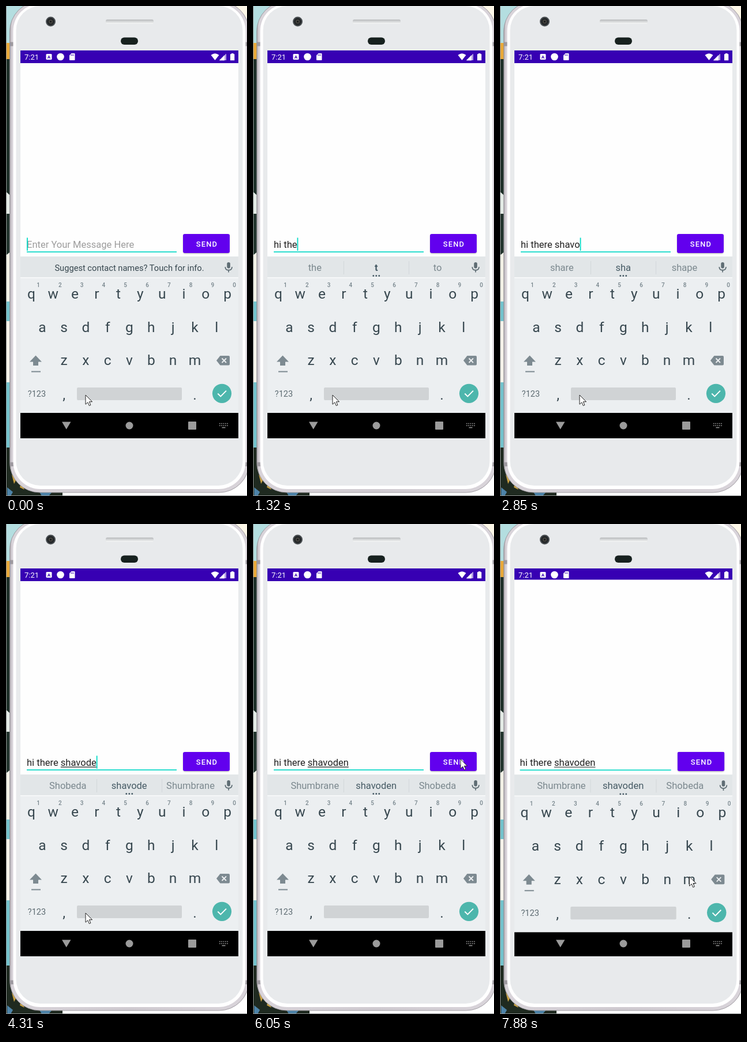
An HTML page for the animation above (8000 ms loop, 418x849 px).

```html
<!DOCTYPE html>
<html lang="en">
<head>
<meta charset="utf-8">
<title>Phone chat</title>
<style>
html, body { margin: 0; width: 100%; height: 100%; overflow: hidden; background: #fff; }
svg { display: block; width: 418px; height: 849px; font-family: Roboto, sans-serif; }
text { white-space: pre; }
.mid { text-anchor: middle; }
.key { font-size: 24.5px; fill: #37474f; }
.num { font-size: 10px; font-weight: 500; fill: #77858c; }
.sug { font-size: 16.5px; fill: #7b888e; }
.field { font-size: 16.55px; }
</style>
</head>
<body>
<svg viewBox="0 0 418 849">
  <defs>
    <linearGradient id="rim" x1="0" x2="1" y1="0" y2="0">
      <stop offset="0" stop-color="#a9a4aa"/>
      <stop offset=".009" stop-color="#d9d4da"/>
      <stop offset=".5" stop-color="#cfcad0"/>
      <stop offset=".991" stop-color="#d9d4da"/>
      <stop offset="1" stop-color="#a9a4aa"/>
    </linearGradient>
    <linearGradient id="slot" x1="0" x2="0" y1="0" y2="1">
      <stop offset="0" stop-color="#b4b6b8"/>
      <stop offset=".45" stop-color="#d6d8d9"/>
      <stop offset="1" stop-color="#f6f7f7"/>
    </linearGradient>
    <filter id="blur" x="-20%" y="-40%" width="140%" height="200%"><feGaussianBlur stdDeviation="1.3"/></filter>
    <clipPath id="screen"><rect x="25" y="77" width="378" height="672"/></clipPath>
    <clipPath id="btn"><rect x="307" y="395" width="81" height="33" rx="3"/></clipPath>
  </defs>

  <g id="wall">
    <rect width="418" height="849" fill="#fff"/>
    <path d="M300 0H418V600H300z" fill="#fdf7e8"/>
    <path d="M0 0H60V66H0z" fill="#b4dee0"/>
    <path d="M0 64H9V98H0z" fill="#e9a93a"/>
    <path d="M0 92H9V330L0 322z" fill="#1d2f28"/>
    <path d="M0 322L9 330V362H0z" fill="#e4ebe6"/>
    <path d="M0 360H9V425L0 432z" fill="#22342d"/>
    <path d="M0 432L9 425V515H0z" fill="#f3f1e6"/>
    <path d="M0 512H9V546H0z" fill="#74c3cd"/>
    <path d="M0 546H9V655H0z" fill="#f6f3ea"/>
    <path d="M0 652H9V770H0z" fill="#74c3cd"/>
    <path d="M0 765H98V849H0z" fill="#1f2a20"/>
    <path d="M10 812L18 820 14 828zM26 826L32 838 24 834z" fill="#c9a142"/>
    <path d="M2 834L12 842 8 849H2zM58 842H80L74 849H62z" fill="#4d83a8"/>
  </g>

  <g id="phone">
    <rect x="6.500" y="-8" width="415" height="851" rx="52" fill="url(#rim)" stroke="#8f8b91" stroke-width=".8"/>
    <path d="M7 66H14M414 66H418M7 794H14M414 794H418" stroke="#9d999f" stroke-width="7"/>
    <rect x="12.500" y="-4" width="403" height="841" rx="47" fill="#fff"/>
    <rect x="17.500" y="0" width="393" height="831" rx="42" fill="#e8eaec"/>
    <circle cx="77.500" cy="27" r="8.500" fill="#4a4f52"/>
    <circle cx="77.500" cy="27" r="6.500" fill="#232628"/>
    <circle cx="77.500" cy="27" r="3.500" fill="#45443f"/>
    <circle cx="77.500" cy="27" r="1.600" fill="#15181b"/>
    <rect x="173" y="23.500" width="83" height="7.500" rx="2.500" fill="url(#slot)"/>
    <rect x="199" y="54.500" width="30" height="12.500" rx="6.200" fill="#17211f"/>
    <path d="M0 0V849M0 849H418" stroke="#8d9090" stroke-width="2"/>
  </g>

  <g id="bars">
    <rect x="25" y="77" width="378" height="23" fill="#3700b3"/>
    <text x="32" y="93" font-size="13" fill="#fff">7:21</text>
    <g fill="#fff">
      <rect x="69.500" y="83" width="10" height="10" rx="1.500"/>
      <circle cx="94.500" cy="88" r="6.300"/>
      <path d="M113.500 82H118.500Q119.500 82 119.500 83V93Q119.500 94 118.500 94H111Q110 94 110 93V85.500z"/>
      <path d="M355.500 85Q362.500 79.500 369.500 85L362.500 94z"/>
      <path d="M389 83.300H391V82H394.500V83.300H396.300V94.300H389z"/>
      <path d="M370.500 94L382 82.500V94z" fill-opacity=".4"/>
      <path d="M370.500 94L379 85.500V94zM381.200 83.400V94" stroke="#fff" stroke-width=".8"/>
    </g>
    <text class="mid" x="74.500" y="91" font-size="8" font-weight="700" fill="#3700b3">A</text>
    <path d="M113 84V86M115 84V86M117 84V86" stroke="#3700b3"/>
    <rect x="25" y="705" width="378" height="44" fill="#000"/>
    <g fill="#9b9b9b">
      <path d="M97 720.500H112.500L104.700 733.500z"/>
      <circle cx="214" cy="727" r="6.500"/>
      <rect x="316" y="720" width="14" height="14" rx="1"/>
      <path d="M374.500 730.500H380.500" stroke="#9b9b9b" stroke-width="1.500"/>
      <path d="M370 723.500H385M370 727H385" stroke="#9b9b9b" stroke-width="1.600" stroke-dasharray="1.700 1.620"/>
    </g>
  </g>

  <g clip-path="url(#screen)">
    <g id="app">
      <rect x="20" y="99" width="388" height="336" fill="#fefefe"/>
      <text class="field" id="hint" x="36" y="419" fill="#9c9c9c">Enter Your Message Here</text>
      <text class="field" id="msg" x="36" y="419" fill="#212121"></text>
      <path id="under" stroke="#212121" stroke-width="1.200"/>
      <path d="M36 426.200H296" stroke="#0fd9c8" stroke-width="1.800"/>
      <rect id="caret" y="401.500" width="1.800" height="22.500" fill="#03dac5"/>
      <rect id="shade" x="307.500" y="397" width="80" height="33" rx="3" filter="url(#blur)"/>
      <g clip-path="url(#btn)">
        <rect x="307" y="395" width="81" height="33" fill="#6200ee"/>
        <circle id="ripple" cx="363" cy="411.500" fill="#fff"/>
      </g>
      <text class="mid" x="348.500" y="416.500" font-size="12.900" font-weight="500" letter-spacing="1.150" fill="#fff">SEND</text>

      <rect x="20" y="434" width="388" height="37" fill="#e2e6e8"/>
      <rect x="20" y="470" width="388" height="235" fill="#eceff1"/>
      <path d="M20 470.800H408" stroke="#fafbfb" stroke-width="1.600"/>
      <text class="mid" id="ask" x="214" y="458.500" font-size="14.650" fill="#37474f">Suggest contact names? Touch for info.</text>
      <g id="strip">
        <path d="M157.500 442V465M270.500 442V465" stroke="#d2d7da"/>
        <g fill="#455a64"><circle cx="208.800" cy="467.500" r="1.400"/><circle cx="213.800" cy="467.500" r="1.400"/><circle cx="218.800" cy="467.500" r="1.400"/></g>
        <text class="sug mid" x="107.300" y="459"></text>
        <text class="sug mid" x="213.700" y="459" style="fill:#455a64"></text>
        <text class="sug mid" x="320" y="459"></text>
      </g>
      <g fill="none" stroke="#5f6d74" stroke-width="1.700">
        <rect x="383.300" y="444" width="5.600" height="10.500" rx="2.800" fill="#5f6d74" stroke="none"/>
        <path d="M380.300 452Q380.300 457.700 386.100 457.700T392 452M386.100 457.500V461.500"/>
      </g>

      <g id="keys"></g>
      <path d="M51.500 605.500L62 616.500H56V623H47V616.500H41zM44 632.500H60V634.500H44z" fill="#7d8a91"/>
      <path d="M371.500 606H386Q388 606 388 608V620.500Q388 622.500 386 622.500H371.500L365 614.200z" fill="#7d8a91"/>
      <path d="M374.500 610.500L382 618M382 610.500L374.500 618" stroke="#eceff1" stroke-width="1.900"/>
      <text class="mid" x="53.500" y="677" font-size="14.500" fill="#5d6b72">?123</text>
      <rect x="123" y="661" width="182" height="22" rx="2" fill="#d0d3d5"/>
      <circle cx="374.500" cy="671.300" r="16.600" fill="#4db6ac"/>
      <path d="M367.300 671.500L372.300 676.500 382 666.700" fill="none" stroke="#fff" stroke-width="1.900"/>
    </g>
  </g>
  <path id="mouse" d="M0 0V16.200L3.800 12.700 6.300 18.500 8.900 17.400 6.400 11.700H11.600z" fill="#fff" stroke="#222" stroke-width="1"/>
</svg>
<script>
const $ = id => document.getElementById(id);
const LOOP = 8000;

// time, typed text, suggestions, index where the underline starts
const typing = [
  [0, "", ""],
  [280, "h", ""],
  [430, "hi", "he h hi"],
  [580, "hi", "his hi him"],
  [730, "hi ", "I there how"],
  [1050, "hi t", "I there how"],
  [1190, "hi th", "the t to"],
  [1320, "hi the", "the t to"],
  [1600, "hi ther", "they the then"],
  [1760, "hi ther", "there ther the", 3],
  [1920, "hi there", "there ther the"],
  [2080, "hi there ", "is are I"],
  [2240, "hi there s", "is are I"],
  [2410, "hi there sh", "so s she"],
  [2570, "hi there sha", "she sh should"],
  [2700, "hi there sha", "share sha shape"],
  [2850, "hi there shavo", "share sha shape"],
  [3000, "hi there shavod", "share sha shape"],
  [3140, "hi there shavod", "Shobeda shavod shaved", 9],
  [3280, "hi there shavode", "Shobeda shavod shaved", 9],
  [3420, "hi there shavode", "Shobeda shavode Shumbrane", 9],
  [4450, "hi there shavoden", "Shobeda shavode Shumbrane", 9],
  [4590, "hi there shavoden", "Shumbrane shavoden Shobeda", 9]
];
const blinks = [[0, 1], [3880, 0], [4310, 1], [4900, 0], [5490, 1], [6050, 0], [6640, 1], [7100, 0]];
const moves = [
  [0, 138, 674], [4900, 186, 640], [5050, 290, 562], [5200, 349.5, 486], [5350, 366, 444],
  [5490, 371, 418], [5630, 367, 408], [5770, 362, 408], [6050, 360, 407.5],
  [7500, 358, 430], [7620, 350, 495], [7750, 338, 565], [7880, 328.5, 611]
];
// time, radius, opacity
const ripples = [[0, 0, 0], [7100, 20, .2], [7250, 46, .23], [7370, 62, .23], [7500, 62, .12], [7620, 0, 0]];

const at = (list, t) => list.findLast(step => step[0] <= t);

function label(x, y, str, cls) {
  return `<text class="mid ${cls}" x="${x}" y="${y}">${str}</text>`;
}

function buildKeys() {
  const pitch = 37.8;
  let out = "";
  ["qwertyuiop", "asdfghjkl", "zxcvbnm"].forEach((row, r) => {
    const left = 43.9 + r * pitch / 2 + (r > 1 ? pitch / 2 : 0);
    [...row].forEach((ch, i) => {
      out += label(left + i * pitch, 507 + r * 57.7, ch, "key");
      if (!r) out += label(56 + i * pitch, 487, (i + 1) % 10, "num");
    });
  });
  $("keys").innerHTML = out + label(100.6, 681.5, ",", "key") + label(327.4, 681.5, ".", "key");
}

const show = (id, on) => $(id).setAttribute("visibility", on ? "visible" : "hidden");
const words = document.querySelectorAll("#strip text");

function draw(t) {
  const [, text, sug, from] = at(typing, t);
  const msg = $("msg");
  msg.textContent = text;
  const width = n => n ? msg.getSubStringLength(0, n) : 0;
  const end = 36 + width(text.length);
  $("caret").setAttribute("x", end);
  show("caret", at(blinks, t)[1]);
  show("hint", !text);
  $("under").setAttribute("d", from ? `M${36 + width(from)} 421.200H${end}` : "");

  show("ask", !sug);
  show("strip", sug);
  const list = sug.split(" ");
  words.forEach((w, i) => w.textContent = list[i] || "");
  words[1].setAttribute("font-weight", list[1] === "t" ? 700 : 400);

  const [, radius, alpha] = at(ripples, t);
  $("ripple").setAttribute("r", radius);
  $("ripple").setAttribute("opacity", alpha);
  $("shade").setAttribute("opacity", radius ? .42 : .3);
  $("shade").setAttribute("y", radius ? 398 : 396);

  const [, x, y] = at(moves, t);
  $("mouse").setAttribute("transform", `translate(${x} ${y})`);
  const zoom = t >= 7880 ? 1.008 : 1;
  $("app").setAttribute("transform", `translate(214 413) scale(${zoom}) translate(-214 -413)`);
}

buildKeys();
const start = performance.now();
function tick() {
  draw((performance.now() - start) % LOOP);
  requestAnimationFrame(tick);
}
tick();
</script>
</body>
</html>
```
